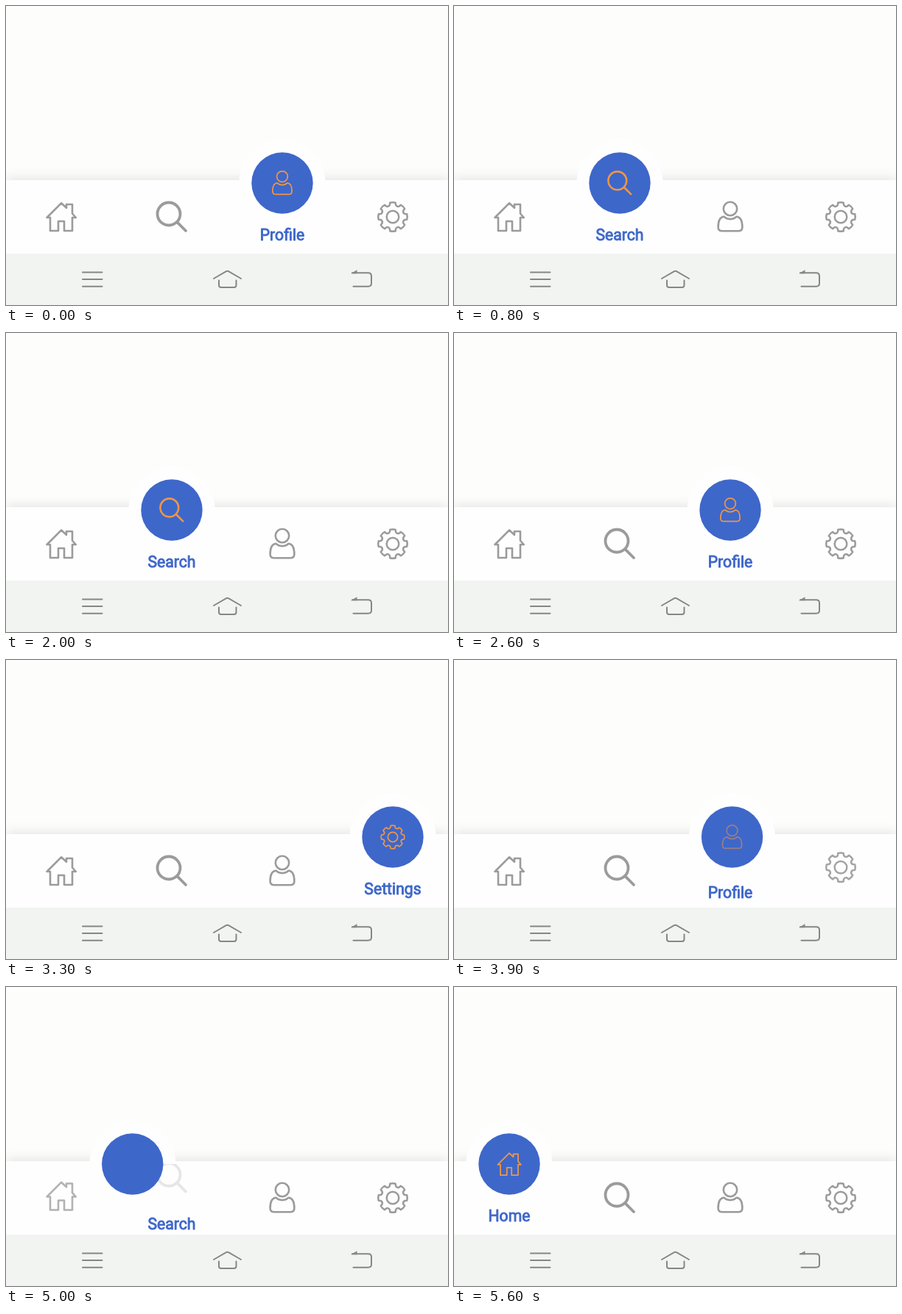
An HTML page with a canvas for the animation above (5700 ms loop, 600 px wide and 407 px high).

```html
<!DOCTYPE html>
<html lang="en">
<head>
<meta charset="utf-8">
<title>Bottom navigation</title>
<style>
  html, body { margin: 0; width: 100%; height: 100%; overflow: hidden; background: #fdfefc; }
  canvas { display: block; width: 600px; height: 407px; }
</style>
</head>
<body>
<canvas id="stage"></canvas>
<script>
const W = 600, H = 407, LOOP = 5700, STEP = 100, DURATION = 300;
const BAR_TOP = 237, NAV_TOP = 337, CIRCLE_Y = 241, ICON_Y = 287, TEXT_Y = 319;
const ICON_RISE = 30, TEXT_DROP = 46;
const GREY = '#9b9b9b', BLUE = '#3e67ca', ORANGE = '#ef9645', WHITE = '#fefefe';
const LABELS = ['Home', 'Search', 'Profile', 'Settings'];

// Each tap: [time in ms, tab index]
const FIRST_TAB = 2;
const TAPS = [[430, 1], [1030, 0], [1683, 1], [2270, 2], [2983, 3], [3630, 2], [4283, 1], [4930, 0]];

const canvas = document.getElementById('stage');
const ctx = canvas.getContext('2d');
const dpr = window.devicePixelRatio || 1;
canvas.width = W * dpr;
canvas.height = H * dpr;

const clamp = v => Math.min(1, Math.max(0, v));
const mix = (a, b, p) => a + (b - a) * p;
const tabX = i => 75 + 150 * i;

function bezier(x1, y1, x2, y2) {
  const at = (a, b, u) => 3 * a * u * (1 - u) ** 2 + 3 * b * u * u * (1 - u) + u ** 3;
  return x => {
    let lo = 0, hi = 1;
    for (let i = 0; i < 24; i++) {
      const mid = (lo + hi) / 2;
      if (at(x1, x2, mid) < x) lo = mid; else hi = mid;
    }
    return at(y1, y2, lo);
  };
}
const easeIn = bezier(0.42, 0, 1, 1);
const easeOut = bezier(0, 0, 0.58, 1);

function gearPath() {
  const point = (r, a) => `${r * Math.sin(a)} ${-r * Math.cos(a)}`;
  const pitch = Math.PI / 4;
  let d = '';
  for (let k = 0; k < 8; k++) {
    const a = k * pitch;
    d += `${k ? 'L' : 'M'}${point(16.6, a - 0.25)}L${point(19.6, a - 0.19)}`;
    d += `Q${point(20.3, a)} ${point(19.6, a + 0.19)}L${point(16.6, a + 0.25)}`;
    d += `Q${point(14.6, a + pitch / 2)} ${point(16.6, a + pitch - 0.25)}`;
  }
  return d + 'ZM8.3 0A8.3 8.3 0 1 1 -8.3 0A8.3 8.3 0 1 1 8.3 0Z';
}

// Icons are centred on the origin: [path, line width]
const ICONS = [
  ['M-19.5 1L0 -18.7L7 -12.2V-17H15V-4.5L19.8 1H15V19H4V6H-4V19H-15V1Z', 2.6],
  ['M11.5 -4A15.5 15.5 0 1 1 -19.5 -4A15.5 15.5 0 1 1 11.5 -4ZM7.2 7.2L19 19', 3.8],
  ['M9.2 -11A9.2 9.2 0 1 1 -9.2 -11A9.2 9.2 0 1 1 9.2 -11Z' +
   'M-8.5 -0.3C-4 4.3 4 4.3 8.5 -0.3C14 0 16.4 6 16.4 14Q16.4 19.3 11 19.3H-11' +
   'Q-16.4 19.3 -16.4 14C-16.4 6 -14 0 -8.5 -0.3Z', 2.6],
  [gearPath(), 2.5]
].map(([d, width]) => [new Path2D(d), width]);

function drawIcon(i, x, y, color, alpha, scale = 1, weight = 1) {
  if (alpha <= 0) return;
  const [path, width] = ICONS[i];
  ctx.save();
  ctx.translate(x, y);
  ctx.scale(scale, scale);
  ctx.globalAlpha = alpha;
  ctx.strokeStyle = color;
  ctx.lineWidth = width * weight;
  ctx.stroke(path);
  ctx.restore();
}

function disc(x, y, r, color, start = 0) {
  ctx.fillStyle = color;
  ctx.beginPath();
  ctx.arc(x, y, r, start, 2 * Math.PI);
  ctx.fill();
}

function drawBar() {
  ctx.save();
  ctx.shadowColor = 'rgba(0,0,0,0.12)';
  ctx.shadowBlur = 16 * dpr;
  ctx.shadowOffsetY = -1.5 * dpr;
  ctx.fillStyle = WHITE;
  ctx.fillRect(0, BAR_TOP, W, NAV_TOP - BAR_TOP);
  ctx.restore();
}

function drawTab(i, selected) {
  // The label moves linearly, the icon eases in from whichever end it leaves.
  const { amount, rise } = selected;
  const x = tabX(i);
  drawIcon(i, x, ICON_Y - ICON_RISE * rise, GREY, 1 - amount);
  if (amount <= 0) return;
  const y = TEXT_Y + TEXT_DROP * (1 - amount);
  ctx.fillStyle = ctx.strokeStyle = BLUE;
  ctx.lineWidth = 0.9;
  ctx.fillText(LABELS[i], x, y);
  ctx.strokeText(LABELS[i], x, y);
}

const NAV_ICONS = new Path2D(
  'M104 362.5H130.5M104 372H130.5M104 381.8H130.5' +
  'M282 371L299 361.2Q300.5 360.4 302 361.2L319 371' +
  'M289 373.5V380Q289 383 292 383H309.5Q312.5 383 312.5 380V373.5' +
  'M470 363.3H491.5Q496 363.3 496 367.5V377.5Q496 381.7 491.5 381.7H471.5');
const BACK_TIP = new Path2D('M468 364.3L476.5 359.3V364.3Z');

function drawSystemNav() {
  ctx.fillStyle = '#f2f4f2';
  ctx.fillRect(0, NAV_TOP, W, H - NAV_TOP);
  ctx.strokeStyle = ctx.fillStyle = '#858785';
  ctx.lineWidth = 2;
  ctx.stroke(NAV_ICONS);
  ctx.fill(BACK_TIP);
}

function stateAt(t) {
  let from = FIRST_TAB, to = FIRST_TAB, start = -DURATION;
  for (const [time, tab] of TAPS) {
    if (time > t) break;
    from = to;
    to = tab;
    start = time;
  }
  return { from, to, p: clamp((t - start) / DURATION) };
}

function draw(t) {
  const { from, to, p } = stateAt(t);
  ctx.setTransform(dpr, 0, 0, dpr, 0, 0);
  ctx.lineCap = ctx.lineJoin = 'round';
  ctx.font = '400 21.2px Roboto, sans-serif';
  ctx.textAlign = 'center';
  ctx.fillStyle = '#fdfefc';
  ctx.fillRect(0, 0, W, H);
  drawBar();

  const rise = easeIn(p);
  for (let i = 0; i < LABELS.length; i++) {
    if (i === to) drawTab(i, { amount: p, rise });
    else if (i === from) drawTab(i, { amount: 1 - p, rise: 1 - rise });
    else drawTab(i, { amount: 0, rise: 0 });
  }

  const x = mix(tabX(from), tabX(to), easeOut(p));
  disc(x, CIRCLE_Y, 58.5, WHITE, Math.PI);
  disc(x, CIRCLE_Y, 41.7, BLUE);
  // The old icon fades in the first fifth, the new one appears in the last.
  drawIcon(from, x, CIRCLE_Y, ORANGE, 1 - clamp(p * 5), 0.8, 0.85);
  drawIcon(to, x, CIRCLE_Y, ORANGE, clamp(p * 5 - 4), 0.8, 0.85);
  drawSystemNav();
}

const began = performance.now();
function tick() {
  const t = (performance.now() - began) % LOOP;
  draw(Math.floor(t / STEP) * STEP);
  requestAnimationFrame(tick);
}
tick();
</script>
</body>
</html>
```
